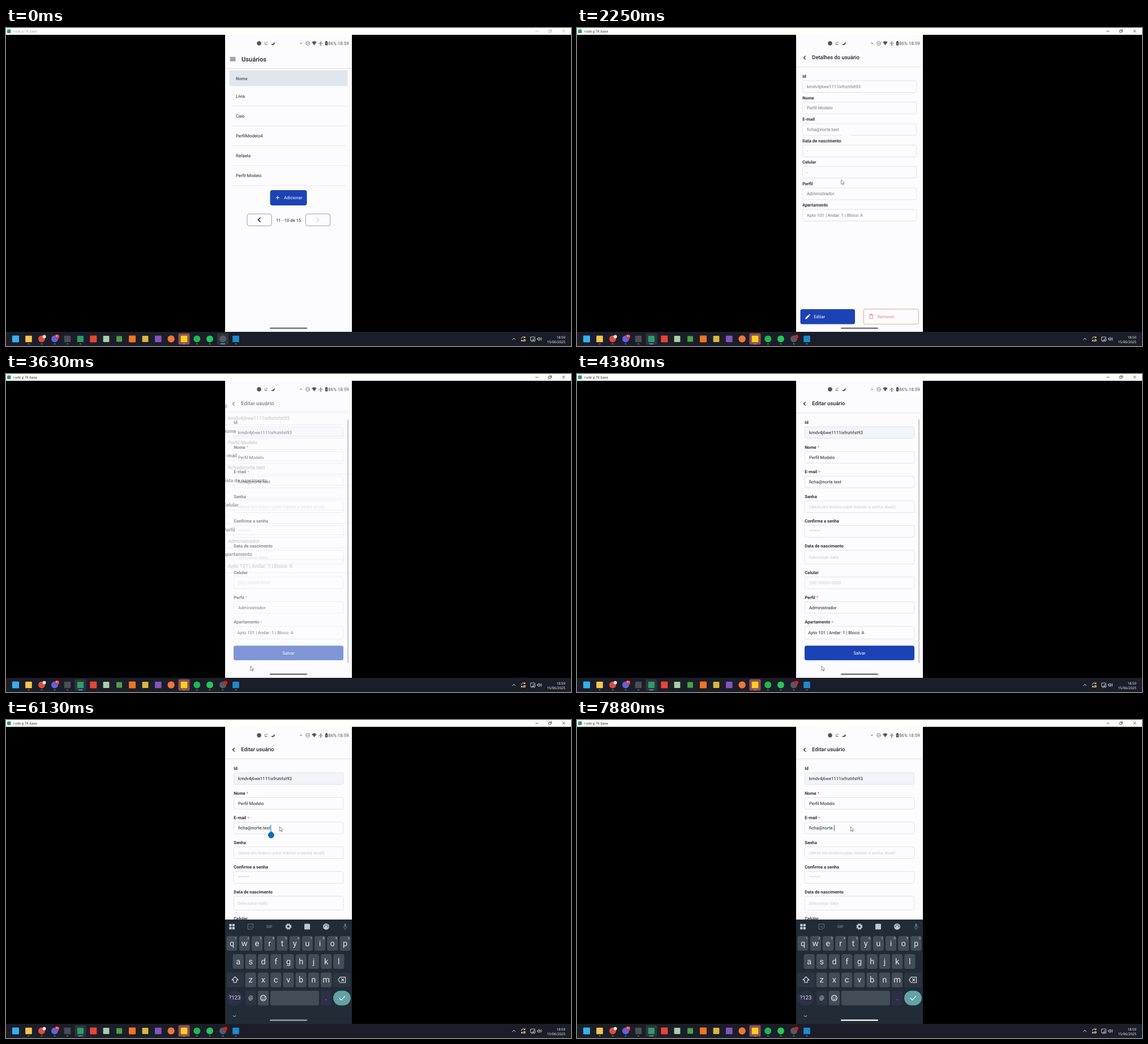
An HTML page for the animation above (8 s loop, 998 by 561 pixels).

```html
<!DOCTYPE html>
<html lang="pt-BR">
<head>
<meta charset="utf-8">
<title>Usuários</title>
<style>
html, body { margin: 0; width: 100%; height: 100%; overflow: hidden; background: #000; }
svg { display: block; width: 100vw; height: 100vh; }
text { font: 7.7px Roboto, sans-serif; fill: #222; dominant-baseline: central; text-rendering: geometricPrecision; }
.line { fill: none; stroke-linecap: round; stroke-linejoin: round; }
.mid { text-anchor: middle; }
.end { text-anchor: end; }
.label { font-weight: 700; fill: #333; }
.req { font-weight: 400; fill: #d9534f; }
.head { font-size: 11.1px; font-weight: 500; }
.sub { font-size: 9.4px; font-weight: 500; }
.soft { fill: #757575; }
.hint { fill: #cbcbd0; }
.white { fill: #fff; }
.danger { fill: #e58a80; }
.status { font-size: 8px; fill: #555; }
.win { font: 6px "Open Sans", sans-serif; }
.tray { font: 6.1px "Open Sans", sans-serif; fill: #fff; }
.badge { font-size: 4.6px; fill: #fff; }
.key { font-size: 14.5px; fill: #e3e6ea; text-anchor: middle; }
.sup { font-size: 6px; fill: #c3c8ce; text-anchor: middle; }
.small { font-size: 9.6px; }

.titlebar, .rec, .tileRec, .tileApp, .old, .pill, .handle, .field, .caret { animation: 8s infinite step-end; }
.list, .form, .details, .fields, .edit, .thumb, .keyboard, .cursor { animation: 8s infinite linear; transform-origin: 499px 274px; }

.titlebar { animation-name: wake; }
.rec { animation-name: rec; }
.tileRec { animation-name: before; }
.tileApp { animation-name: after; }
.list { animation-name: listOut; }
.details { animation-name: detailsIn; }
.fields { animation-name: fieldsOut; }
.old { animation-name: oldOut; }
.edit { animation-name: editIn; }
.thumb { animation-name: thumb; }
.keyboard { animation-name: rise; }
.pill { animation-name: pill; }
.handle { animation-name: handle; }
.field { animation-name: erase; }
.caret { animation-name: blink; }
.cursor { animation-name: point; }

@keyframes wake { 0% { opacity: .42 } 10% { opacity: .62 } 21%, 100% { opacity: 1 } }
@keyframes rec { 0% { opacity: 0 } 5%, 100% { opacity: 1 } }
@keyframes before { 0% { opacity: 1 } 21%, 100% { opacity: 0 } }
@keyframes after { 0% { opacity: 0 } 21%, 100% { opacity: 1 } }
@keyframes listOut { 0%, 22% { transform: none } 23.5%, 100% { transform: scale(1.15) } }
@keyframes detailsIn {
  0%, 22.4% { opacity: 0; transform: scale(.9) }
  23.6% { opacity: .55; transform: none }
  25%, 100% { opacity: 1; transform: none }
}
@keyframes fieldsOut { 0%, 43.5% { transform: none } 45%, 100% { transform: scale(1.15) } }
@keyframes oldOut { 0% { opacity: 1 } 43.8%, 100% { opacity: 0 } }
@keyframes editIn {
  0%, 44% { opacity: 0; transform: scale(.9) }
  45.2% { opacity: .55; transform: none }
  45.6% { opacity: .57; transform: none }
  46.9%, 100% { opacity: 1; transform: none }
}
@keyframes thumb { 0%, 44.6% { opacity: 0 } 45.2%, 55% { opacity: 1 } 58%, 100% { opacity: 0 } }
@keyframes rise {
  0%, 72.5% { transform: translateY(186px); animation-timing-function: ease-out }
  76%, 100% { transform: none }
}
@keyframes pill { 0% { fill: #666 } 74% { fill: #a4a9b0 } 89%, 100% { fill: #fff } }
@keyframes handle { 0% { opacity: 0 } 75% { opacity: 1 } 90%, 100% { opacity: 0 } }
@keyframes erase {
  0% { transform: translateX(466.9px) }
  90% { transform: translateX(464.4px) }
  92.25% { transform: translateX(460.4px) }
  94.5% { transform: translateX(456.3px) }
  97%, 100% { transform: translateX(453.8px) }
}
@keyframes blink { 0% { opacity: 0 } 75% { opacity: 1 } 80% { opacity: 0 } 86% { opacity: 1 } 100% { opacity: 1 } }
@keyframes point {
  0%, 7% { opacity: 0; transform: translate(330px, 380px) }
  7.1% { opacity: 1; transform: translate(330px, 380px); animation-timing-function: ease-out }
  12.5%, 14.3% { opacity: 1; transform: translate(464.5px, 323.5px); animation-timing-function: ease-in-out }
  17.5%, 34.4% { transform: translate(466.7px, 267.5px); animation-timing-function: ease-in-out }
  40.6% { transform: translate(430.5px, 508px) }
  45.2%, 55% { transform: translate(432px, 515px); animation-timing-function: ease-in-out }
  65.6%, 70% { transform: translate(478px, 183.5px) }
  72.5%, 100% { opacity: 1; transform: translate(483.2px, 188px) }
}
</style>
</head>
<body>
<svg id="stage" viewBox="0 0 998 561"></svg>
<script>
const BLUE = '#1c43b4', PAPER = '#fcfcff', EDGE = '#dcdce2';

const text = (x, y, s, cls = '') => `<text x="${x}" y="${y}" class="${cls}">${s}</text>`;
const rect = (x, y, w, h, fill, r = 0, more = '') =>
  `<rect x="${x}" y="${y}" width="${w}" height="${h}" rx="${r}" fill="${fill}" ${more}/>`;
const frame = (x, y, w, h, stroke, r = 3, fill = 'none') => rect(x, y, w, h, fill, r, `stroke="${stroke}" stroke-width=".8"`);
const dot = (x, y, r, fill) => `<circle cx="${x}" cy="${y}" r="${r}" fill="${fill}"/>`;
const line = (d, color, w = 1) => `<path class="line" d="${d}" stroke="${color}" stroke-width="${w}"/>`;
const group = (cls, ...parts) => `<g class="${cls}">${parts.join('')}</g>`;
const paper = rect(387, 12, 224, 524, PAPER);

const titlebar = rect(0, 0, 998, 12, '#fefefa') + rect(2, 2.5, 6.5, 6.5, '#2c9c69', 1) +
  group('titlebar', text(13, 6.2, 'rudo g 7K base', 'win'),
    line('M935.5 5.8h4.5', '#222', .7),
    line('M958.8 4.2h3.4v3.4h-3.4zM960.2 3h3.3v3.4', '#222', .7),
    line('M982.8 3.2l4.4 4.4m0-4.4l-4.4 4.4', '#222', .7));

const statusBar = dot(447, 27, 3.8, '#555') +
  line('M457 26h1.2m2-1h1.3M457.2 28.4q1.8 1.6 3.6 0', '#555', 1.1) +
  '<path d="M474 24.5a3.4 3.4 0 1 1-6 4q4.5 0 6-4z" fill="#555"/>' +
  dot(521, 27, 1, '#555') +
  line('M536.4 27a3.4 3.4 0 1 1-6.8 0a3.4 3.4 0 1 1 6.8 0M531.3 27h3.4', '#666', .8) +
  '<path d="M540.2 25q4.2-3.4 8.4 0l-4.2 5.6z" fill="#555"/>' +
  line('M556 23.8v6.4M552.8 27.8l3.2-2 3.2 2M554.8 30.4l1.2-.8 1.2.8', '#555', .9) +
  rect(563.8, 24, 4.4, 6.6, '#444', .7) + rect(565, 23, 2, 1.2, '#444') + rect(565.7, 25.4, .7, 3.6, '#fff') +
  text(569, 27.2, '86%', 'status') + text(605.7, 27.2, '18:59', 'status end');

const names = ['Lívia', 'Caio', 'PerfilModelo4', 'Rafaela', 'Perfil Modelo'];
const list = group('list', paper,
  line('M396 52h9m-9 2.9h9m-9 2.9h9', '#222', 1.1), text(416, 55, 'Usuários', 'head'),
  rect(387, 71, 224, 1, '#dfdfe6'), rect(394.5, 75, 209, 27.5, '#e1e5ec'),
  `<text x="406" y="89.4" style="font-weight:700;fill:#666">Nome</text>`,
  names.map((n, i) => text(406, 120 + 35.15 * i, n) + rect(397, 137 + 35.15 * i, 204, .8, '#e4e4ea')).join(''),
  rect(466.5, 286, 65, 27, BLUE, 4),
  line('M477 299.3h5.6m-2.8-2.8v5.6', '#fff', 1), text(491, 299.4, 'Adicionar', 'white'),
  frame(426, 328, 43.2, 21, '#85858a', 3.5), frame(529.3, 328, 43.2, 21, '#85858a', 3.5),
  line('M449 334.8l-3.6 3.6 3.6 3.6', '#222', 1.6), line('M549 334.8l3.6 3.6-3.6 3.6', '#cfcfd3', 1.3),
  text(499, 339, '11 - 10 de 15', 'mid'));

const header = title => line('M403.4 49.6l-2.9 2.9 2.9 2.9', '#222', 1.3) + text(415.3, 52.7, title, 'sub') +
  rect(387, 68.3, 224, .9, '#dfdfe6');

const id = 'kmdv4j6we1111ixfnztrlst93', mail = 'ficha@norte.test', home = 'Apto 101 | Andar: 1 | Bloco: A';
const info = [['Id', id], ['Nome', names[4]], ['E-mail', mail], ['Data de nascimento', '-'],
  ['Celular', '-'], ['Perfil', 'Administrador'], ['Apartamento', home]];
const details = group('details', paper,
  group('fields', info.map(([label, value], i) => {
    const y = 37.82 * i;
    return text(398, 85.4 + y, label, 'label') + frame(398.3, 93 + y, 201.4, 20.6, EDGE) + text(406, 103.6 + y, value, 'soft');
  }).join('')),
  group('old', header('Detalhes do usuário'),
    rect(394.5, 496, 96.5, 26.5, BLUE, 3.5),
    '<path d="M403.4 513.4v-2l5.2-5.2 2 2-5.2 5.2zM409.2 505.6l1-1 2 2-1 1z" fill="#fff"/>',
    text(418.3, 509.3, 'Editar', 'white'),
    frame(506.3, 495.8, 97, 26.8, '#e58a80', 3.5),
    line('M517.4 507h5v5.6h-5zM516.5 505.4h6.8m-4.3-.9h1.8', '#e58a80', .9),
    text(530.4, 509.3, 'Remover', 'danger')));

// label, label y, box y, box height, value, value x, value class
const form = [
  ['Id', 85.4, 93, 20.6, id, 410, ''],
  ['Nome*', 129, 136.7, 20.6, names[4], 410, ''],
  ['E-mail*', 172.5, 180.2, 20.6, mail, 410, ''],
  ['Senha', 216.2, 223.7, 20.8, '(deixe em branco para manter a senha atual)', 410, 'hint'],
  ['Confirme a senha', 259.8, 267.3, 20.8, '******', 410, 'hint'],
  ['Data de nascimento', 303.4, 310.8, 24.4, 'Selecionar data', 409, 'hint'],
  ['Celular', 350.5, 358, 21, '(00) 00000-0000', 410, 'hint'],
  ['Perfil*', 394, 401.5, 20.6, 'Administrador', 410, ''],
  ['Apartamento*', 437.5, 445, 22.6, home, 408.3, '']
];
const edit = group('edit', paper, header('Editar usuário'),
  form.map(([label, ly, by, h, value, x, cls], i) =>
    text(402.2, ly, label.replace('*', '<tspan class="req"> *</tspan>'), 'label') +
    frame(402.4, by, 193.4, h, EDGE, 3, i ? PAPER : '#f3f3fa') +
    text(x, by + h / 2 + .2, value, cls)).join(''),
  rect(402, 479.3, 194, 25.8, BLUE, 3.5), text(499, 492.4, 'Salvar', 'white mid'));

const typing = group('field', rect(.2, 184.5, 16, 12, PAPER), rect(.2, 185, 1.1, 10.8, '#1976d2', 0, 'class="caret"')) +
  '<path class="handle" d="M468.3 196l4 3.4a5.5 5.5 0 1 1-8 0z" fill="#0d6cb6"/>';

const KEY = '#434d58', MOD = '#2c3541', INK = '#e3e6ea', DIM = '#69737e', ICON = '#c2c7cd';
const keyRow = (chars, x0, y, digits = '') => [...chars].map((c, i) => {
  const x = x0 + 22.22 * i;
  return rect(x - 9.6, y - 13, 19.2, 26, KEY, 3.5) + text(x, y, c, 'key') +
    (digits ? text(x + 6.6, y - 8.5, digits[i], 'sup') : '');
}).join('');
const tools = [0, 1, 2, 3].map(i => rect(394.2 + 5.4 * (i % 2), 359.7 + 5.4 * (i >> 1), 4.4, 4.4, ICON, 1)).join('') +
  line('M427.6 360h9v6l-3 3h-6zM430 364.5q2 2.4 4 0', DIM, 1) +
  `<text x="465.3" y="364.6" class="mid" style="fill:${DIM};font-weight:700;font-size:7.4px">GIF</text>` +
  `<circle cx="498.8" cy="364.4" r="3.2" fill="none" stroke="${ICON}" stroke-width="2.6"/>` +
  `<circle cx="498.8" cy="364.4" r="4.9" fill="none" stroke="${ICON}" stroke-width="1.3" stroke-dasharray="2.4 1.45"/>` +
  rect(527, 359.6, 10, 10, ICON, 1.2) +
  dot(565.4, 364.4, 5.5, ICON) + [[562.4, 364.5], [564, 361.7], [567, 361.7], [568.5, 364.5]].map(([x, y]) => dot(x, y, .9, '#212c37')).join('') +
  rect(597.4, 359, 3.2, 6.4, DIM, 1.6) + line('M595.4 364.2q.3 3.6 3.6 3.6t3.6-3.6M599 368v2', DIM, .9);
const keyboard = group('keyboard', rect(387, 352, 224, 184, '#212c37'), tools,
  keyRow('qwertyuiop', 399, 394, '1234567890'),
  keyRow('asdfghjkl', 410.1, 426),
  rect(389.5, 445.5, 30.5, 26, MOD, 3.5), line('M404.6 453l5.6 5.6h-3v4.4h-5.2v-4.4h-3z', INK, 1.1),
  keyRow('zxcvbnm', 432.2, 458.4),
  rect(578, 445.5, 30.5, 26, MOD, 3.5),
  line('M590.2 453.6h9.4v9.6h-9.4l-3.4-4.8zM592.6 456.3l4.2 4.2m0-4.2l-4.2 4.2', INK, 1.1),
  rect(389.5, 477.5, 29, 26, '#2d3047', 13), text(404, 490.6, '?123', 'key small'),
  rect(422.6, 477.5, 19.2, 26, MOD, 3.5), text(432.2, 490.8, '@', 'key small'),
  rect(444.8, 477.5, 19.2, 26, KEY, 3.5),
  `<circle cx="454.4" cy="490.4" r="4.8" fill="none" stroke="#fff" stroke-width="1.1"/>`,
  dot(452.6, 489.2, .8, '#fff'), dot(456.2, 489.2, .8, '#fff'), line('M451.8 491.6q2.6 3 5.2 0', '#fff', 1),
  rect(467, 477.5, 86, 26, KEY, 3.5),
  rect(556, 477.5, 19.2, 26, '#2d3047', 3.5), text(565.6, 491.5, '.', 'key small'),
  rect(578, 477.5, 30.8, 26, '#62a2a5', 13), line('M588.8 490.6l3.4 3.4 6.4-6.6', '#fff', 1.2),
  line('M401.2 521.6l2.2 2.2 2.2-2.2', INK, 1));

// x, shape (s square, c circle), half size, colour
const apps = [
  [17, 's', 6, '#35b1ee'], [40, 's', 5.8, '#f3c64d'], [63, 'c', 6, '#e04a3c'], [86, 'c', 6, '#5865e8'],
  [108.5, 's', 5.8, '#4a4f56'], [131.4, 's', 5.6, '#2c9c69'], [154.3, 's', 6, '#ea4335'], [177, 's', 5.4, '#a9cfa5'],
  [200, 's', 5, '#4e9f4c'], [223, 's', 6, '#f47521'], [246, 's', 5.4, '#d9b83d'], [268.8, 's', 5.8, '#8354c0'],
  [291.6, 'c', 6.2, '#f4743b'], [314.5, 's', 5.8, '#fbcf1c'], [337.3, 'c', 6, '#1db954'], [360, 'c', 6, '#25c65a'],
  [383, 'c', 6, '#565a62'], [406, 's', 5.8, '#1f8ad2']
];
const running = [40, 63, 86, 108.5, 131.4, 314.5, 337.3, 360, 383, 406];
const active = (cls, x) => group(cls, rect(x - 10, 538.5, 20, 20, '#2f343d', 2), rect(x - 4, 556.7, 8, 1.4, '#6cc3ee', .7));
const taskbar = rect(0, 536, 998, 25, '#1b1e28') +
  running.map(x => rect(x - 1.5, 556.8, 3, 1.2, '#8d9097', .6)).join('') +
  rect(304.5, 538.5, 20, 20, '#8f4f55', 2) + rect(313, 556.8, 3, 1.2, '#d8a0a0', .6) +
  active('tileRec', 383) + active('tileApp', 131.4) +
  apps.map(([x, kind, r, c]) => kind === 'c' ? dot(x, 548.5, r, c) : rect(x - r, 548.5 - r, 2 * r, 2 * r, c, 1)).join('') +
  dot(67.6, 544.5, 3, '#e6e6e6') +
  dot(90.3, 544.4, 3.9, '#e0363e') + text(90.3, 544.6, '9+', 'badge mid') +
  group('rec', dot(387.6, 544.6, 3.3, '#f0121c')) +
  line('M894.6 549.8l2.5-2.5 2.5 2.5', '#fff', .9) +
  line('M910.4 547.8a3.5 3.5 0 0 1 6.4-1.4v-2m0 2h-2M916.8 549.6a3.5 3.5 0 0 1-6.4 1.2v2m0-2h2', '#eee', .9) +
  dot(915.8, 551, 2.2, '#f0932b') +
  line('M932 551.4h-5.4v-6.3h7.6v2M928 553h2.4M931.6 548.4h3v3.4h-3zM933 552v1.2', '#eee', .8) +
  line('M938.8 547.4h1.3l1.9-1.7v5.8l-1.9-1.7h-1.3zM943.6 547.3q1 1.3 0 2.6M945.2 546q2 2.6 0 5.2', '#eee', .8) +
  text(988, 545, '18:59', 'tray end') + text(988, 553, '15/06/2025', 'tray end');

const cursor = group('cursor',
  '<path d="M0 0v8.2l1.9-1.7 1.3 2.8 1.3-.6-1.3-2.7h2.5z" fill="#fff" stroke="#555" stroke-width=".7"/>');

document.getElementById('stage').innerHTML =
  '<clipPath id="phone"><rect x="387" y="12" width="224" height="524"/></clipPath>' +
  rect(0, 0, 998, 561, '#000') + titlebar +
  `<g clip-path="url(#phone)">${list}${details}${edit}` +
  rect(387, 12, 224, 26, PAPER) + statusBar +
  rect(603, 80, 2, 430, '#c6c6ca', 1, 'class="thumb"') +
  `${typing}${keyboard}` + rect(466, 528.4, 66, 2.4, '#666', 1.2, 'class="pill"') + '</g>' +
  taskbar + cursor;
</script>
</body>
</html>
```
